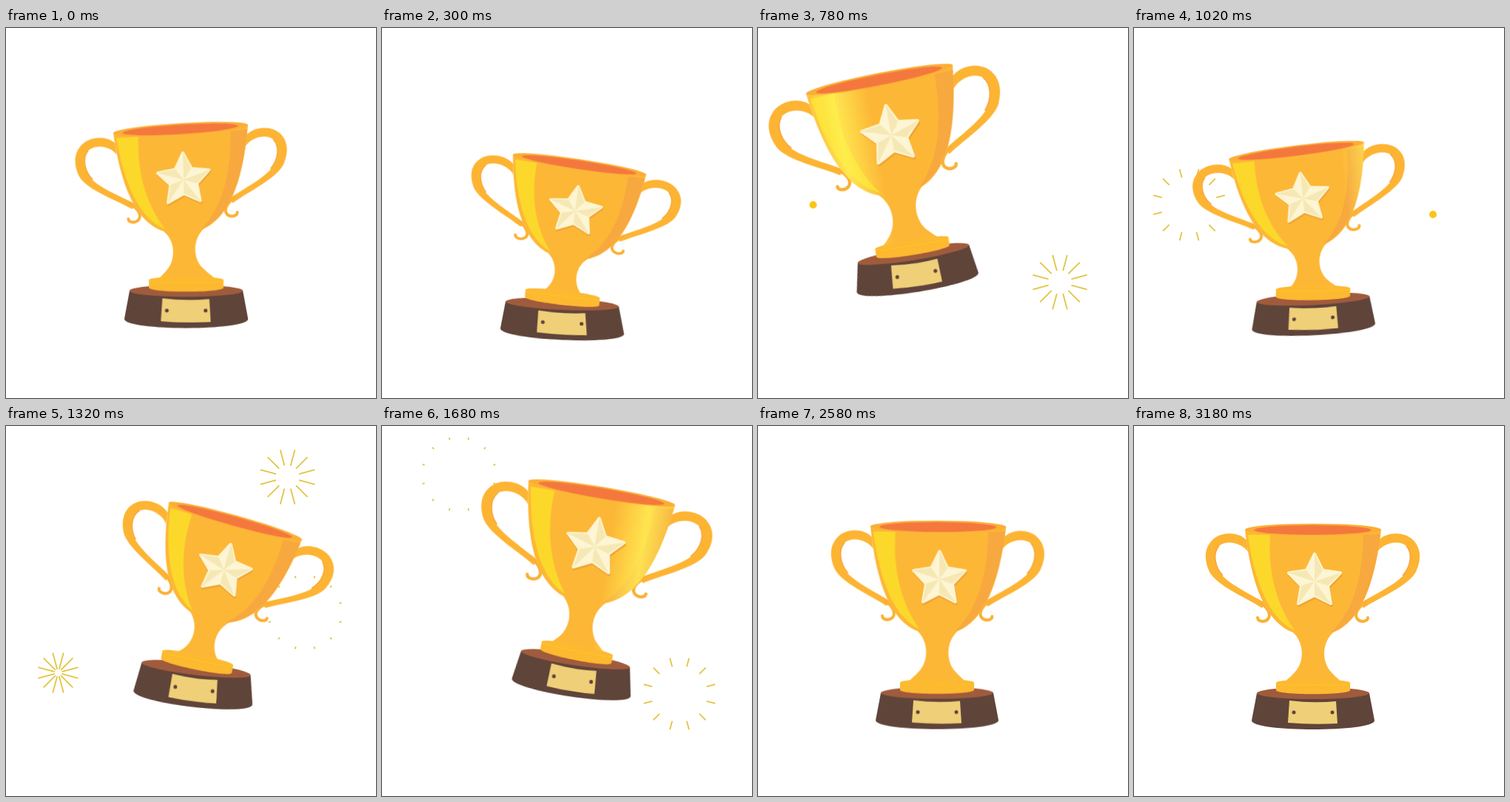
Write an HTML page without scripts that moves like this. It is 500 by 500 pixels and loops after 3.24 s.

```html
<!DOCTYPE html>
<html lang="en">
<head>
<meta charset="utf-8">
<title>Jumping trophy</title>
<style>
html, body { margin: 0; width: 100%; height: 100%; overflow: hidden; background: #fff; }
svg { display: block; width: 100vw; height: 100vh; }

/* 54 poses of 60 ms; each stretch is stepped pose by pose */
.cup { animation: cup 3240ms infinite; }
.base { animation: base 3240ms infinite; }
.plinth { transform-origin: 242px 355px; animation: plinth 3240ms infinite; }
.shine { animation: shine 3240ms step-end infinite; }
.gleam { animation: gleam 3240ms step-end infinite; }
.ray {
  d: path("M0 0L54 14.5M0 0L39.5 39.5M0 0L14.5 54M0 0L-14.5 54M0 0L-39.5 39.5M0 0L-54 14.5M0 0L-54 -14.5M0 0L-39.5 -39.5M0 0L-14.5 -54M0 0L14.5 -54M0 0L39.5 -39.5M0 0L54 -14.5");
  fill: none; stroke: #e3c443; stroke-width: 1.8;
  animation: ray 3240ms step-end infinite;
}
.dot { fill: #fbc516; animation: dot 3240ms step-end infinite; }
.ray, .dot { animation-delay: calc(var(--n) * 60ms - 3240ms); }

@keyframes cup {
  0%, 100% { transform: matrix(.989,-.06,.029,.983,236,136.5); animation-timing-function: steps(5); }
  9.259% { transform: matrix(.978,.147,-.113,.89,267,184.5); animation-timing-function: steps(1); }
  11.111% { transform: matrix(.98,.17,-.13,.87,273,192); animation-timing-function: steps(3); }
  16.666% { transform: matrix(1,-.2,.2,1.05,188,125); animation-timing-function: steps(2); }
  20.37% { transform: matrix(1.076,-.217,.202,1.067,163,36); animation-timing-function: steps(2); }
  24.074% { transform: matrix(1.076,-.21,.202,1.085,164,69.5); animation-timing-function: steps(3); }
  29.629% { transform: matrix(1,-.1,.08,.97,222,152); animation-timing-function: steps(2); }
  33.333% { transform: matrix(.98,-.147,.113,.88,217,180); animation-timing-function: steps(2); }
  37.037% { transform: matrix(.98,-.05,.06,.9,228,172); animation-timing-function: steps(2); }
  40.74% { transform: matrix(.978,.272,-.25,.935,310,128.5); animation-timing-function: steps(3); }
  46.296% { transform: matrix(1.076,.22,-.2,1.06,331,24); animation-timing-function: steps(2); }
  50% { transform: matrix(1.076,.2,-.18,1.05,319,45); animation-timing-function: steps(1); }
  51.851% { transform: matrix(1.076,.179,-.168,1.035,297,90.5); animation-timing-function: steps(2); }
  55.555% { transform: matrix(1.03,.05,-.04,.97,256,148); animation-timing-function: steps(2); }
  59.259% { transform: matrix(1.03,.02,-.01,.88,243,184); animation-timing-function: steps(4); }
  66.666% { transform: matrix(1.016,0,.02,.98,235.5,144); animation-timing-function: steps(4); }
  74.074% { transform: matrix(.99,.01,-.02,1.04,246,130); animation-timing-function: steps(5); }
  83.333%, 98.148% { transform: matrix(1,0,0,1,242,140); animation-timing-function: steps(1); }
}
@keyframes base {
  0%, 100% { transform: matrix(1.007,0,0,1.03,242.5,355); animation-timing-function: steps(5); }
  9.259% { transform: matrix(1.007,.045,0,.99,242.5,373); animation-timing-function: steps(1); }
  11.111% { transform: matrix(1.01,.06,0,.99,243,377); animation-timing-function: steps(3); }
  16.666% { transform: matrix(1,-.13,.13,1.05,231,357); animation-timing-function: steps(2); }
  20.37% { transform: matrix(1,-.16,.154,1.04,208,272); animation-timing-function: steps(2); }
  24.074% { transform: matrix(.99,-.16,.154,1.04,209,305.5); animation-timing-function: steps(3); }
  29.629% { transform: matrix(1,-.05,.04,1,240,366); animation-timing-function: steps(2); }
  33.333% { transform: matrix(1.007,-.05,0,.99,242,367); animation-timing-function: steps(2); }
  37.037% { transform: matrix(1,0,0,1,242,364); animation-timing-function: steps(2); }
  40.74% { transform: matrix(.968,.113,-.115,1.05,256,328); animation-timing-function: steps(3); }
  46.296% { transform: matrix(.97,.16,-.16,1.04,288,258); animation-timing-function: steps(2); }
  50% { transform: matrix(.97,.15,-.155,1.03,278,277); animation-timing-function: steps(1); }
  51.851% { transform: matrix(.967,.145,-.154,1.03,260.5,315); animation-timing-function: steps(2); }
  55.555% { transform: matrix(1,.03,-.03,1,247,364); animation-timing-function: steps(2); }
  59.259% { transform: matrix(1.02,0,0,1,241.5,371); animation-timing-function: steps(4); }
  66.666% { transform: matrix(1.035,-.013,0,1.05,240.5,359); animation-timing-function: steps(4); }
  74.074% { transform: matrix(1,0,0,1,241,360); animation-timing-function: steps(5); }
  83.333%, 98.148% { transform: matrix(1,0,0,1,241,361); animation-timing-function: steps(1); }
}
@keyframes plinth {
  0%, 66.666%, 100% { transform: rotate(0deg); animation-timing-function: steps(5); }
  9.259% { transform: rotate(4deg); animation-timing-function: steps(8); }
  24.074% { transform: rotate(0deg); animation-timing-function: steps(9); }
  40.74% { transform: rotate(4.5deg); animation-timing-function: steps(6); }
  51.851% { transform: rotate(2.5deg); animation-timing-function: steps(8); }
}
@keyframes shine {
  0%, 100% { transform: translateX(-150px); }
  20.37%, 42.592% { transform: translateX(-135px); animation-timing-function: steps(7); }
  33.333%, 55.555% { transform: translateX(145px); }
}
@keyframes gleam {
  0%, 55.555%, 100% { transform: translateX(-150px); }
  42.592% { transform: translateX(-145px); animation-timing-function: steps(7); }
}
@keyframes ray {
  0% { stroke-dasharray: 0 100; stroke-dashoffset: 0; }
  1.851% { stroke-dasharray: 23 100; stroke-dashoffset: -5; }
  3.703% { stroke-dasharray: 22 100; stroke-dashoffset: -16; }
  5.555% { stroke-dasharray: 17 100; stroke-dashoffset: -28; }
  7.407% { stroke-dasharray: 12 100; stroke-dashoffset: -38; }
  9.259% { stroke-dasharray: 3 100; stroke-dashoffset: -48; }
  11.111%, 100% { stroke-dasharray: 0 100; stroke-dashoffset: 0; }
}
@keyframes dot {
  0% { opacity: 1; }
  1.851%, 100% { opacity: 0; }
}
</style>
</head>
<body>
<svg viewBox="0 0 500 500">
  <defs>
    <path id="body" d="M150 140C156 192 170 262 215 279C231 294 230 320 217 333C209 342 202 346 199 351H285C282 346 275 342 267 333C254 320 253 294 269 279C314 262 328 192 334 140Z"/>
    <path id="block" d="M166 361L159 398C159 414 325 414 325 398L318 361Z"/>
    <clipPath id="inBody"><use href="#body"/></clipPath>
    <clipPath id="inBlock"><use href="#block"/></clipPath>
    <linearGradient id="glow">
      <stop offset="0" stop-color="#fff458" stop-opacity="0"/>
      <stop offset=".5" stop-color="#fff458" stop-opacity=".75"/>
      <stop offset="1" stop-color="#fff458" stop-opacity="0"/>
    </linearGradient>
    <linearGradient id="pale">
      <stop offset="0" stop-color="#fff" stop-opacity="0"/>
      <stop offset=".5" stop-color="#fff" stop-opacity=".22"/>
      <stop offset="1" stop-color="#fff" stop-opacity="0"/>
    </linearGradient>

    <g id="handle">
      <path fill="#fdb433" d="M152 154C140 142 118 143 107 153C95 164 94 180 102 197C112 216 150 231 173 246L177 239C155 226 135 217 121 204C109 191 106 172 115 162C126 153 146 158 154 170Z"/>
      <path fill="none" stroke="#f6a53a" stroke-width="1.500" d="M120 202C109 190 106 172 115 162"/>
      <path fill="none" stroke="#fbb034" stroke-width="4" stroke-linecap="round" d="M169 238C181 245 186 255 181 261C176 266 167 264 167 259"/>
    </g>

    <path id="star" stroke-width="4" stroke-linejoin="round" d="M0-37L11-15 35-11.500 18 6 22 30 0 19-22 30-18 6-35-11.500-11-15Z"/>
    <path id="facet" d="M0 0V-38L11-15Z"/>
  </defs>

  <g transform="translate(408 343.500)" style="--n:11"><path class="ray"/><circle class="dot" r="5"/></g>
  <g transform="translate(74.500 239)" style="--n:13"><path class="ray"/><circle class="dot" r="5"/></g>
  <g transform="translate(404 252)" style="--n:17"><path class="ray"/><circle class="dot" r="5"/></g>
  <g transform="translate(380.500 69)" style="--n:20"><path class="ray"/><circle class="dot" r="5"/></g>
  <g transform="translate(70.500 333.500)" style="--n:21"><path class="ray"/><circle class="dot" r="5"/></g>
  <g transform="translate(104 65)" style="--n:23"><path class="ray"/><circle class="dot" r="5"/></g>
  <g transform="translate(402 362)" style="--n:24"><path class="ray"/><circle class="dot" r="5"/></g>

  <g class="cup"><g transform="translate(-242 -140)">
    <use href="#handle"/>
    <use href="#handle" transform="translate(483) scale(-1 1)"/>
    <use href="#body" fill="#fdb736"/>
    <path fill="#fcd82b" d="M154 147C160 192 176 257 217 276C190 238 181 192 184 147Z"/>
    <path fill="#f7a83e" d="M333 146C327 192 314 262 265 280C300 248 309 197 310 147Z"/>
    <g clip-path="url(#inBody)">
      <rect class="shine" x="196" y="130" width="84" height="225" fill="url(#glow)"/>
    </g>
    <ellipse cx="242" cy="140" rx="92" ry="8" fill="#fbae35"/>
    <ellipse cx="241.500" cy="140.500" rx="79" ry="6.500" fill="#f4783e"/>
    <g transform="translate(244 210)">
      <use href="#star" y="2.500" x="1" fill="#f0a433" stroke="#f0a433"/>
      <use href="#star" fill="#fdf5d3" stroke="#fdf5d3"/>
      <g fill="#f5e8b4">
        <use href="#facet"/>
        <use href="#facet" transform="rotate(72)"/>
        <use href="#facet" transform="rotate(144)"/>
        <use href="#facet" transform="rotate(216)"/>
        <use href="#facet" transform="rotate(288)"/>
      </g>
    </g>
  </g></g>

  <g class="base"><g transform="translate(-241 -361)">
    <use href="#block" fill="#5f443a"/>
    <ellipse cx="242" cy="361" rx="76" ry="8" fill="#a05b3d"/>
    <g class="plinth">
      <path fill="#fdb92f" d="M192 347V357C192 364 292 364 292 357V347C292 341 192 341 192 347Z"/>
      <path fill="none" stroke="#fbc62f" d="M192 347C192 351 210 350 242 350S292 351 292 347"/>
    </g>
    <path fill="#efcf78" d="M210 371Q242 375 273 372L275 402Q242 404 208 401Z"/>
    <g fill="#5f443a"><circle cx="216" cy="387" r="2.500"/><circle cx="268" cy="387" r="2.500"/></g>
    <g clip-path="url(#inBlock)">
      <rect class="gleam" x="190" y="368" width="110" height="45" fill="url(#pale)"/>
    </g>
  </g></g>
</svg>
</body>
</html>
```
